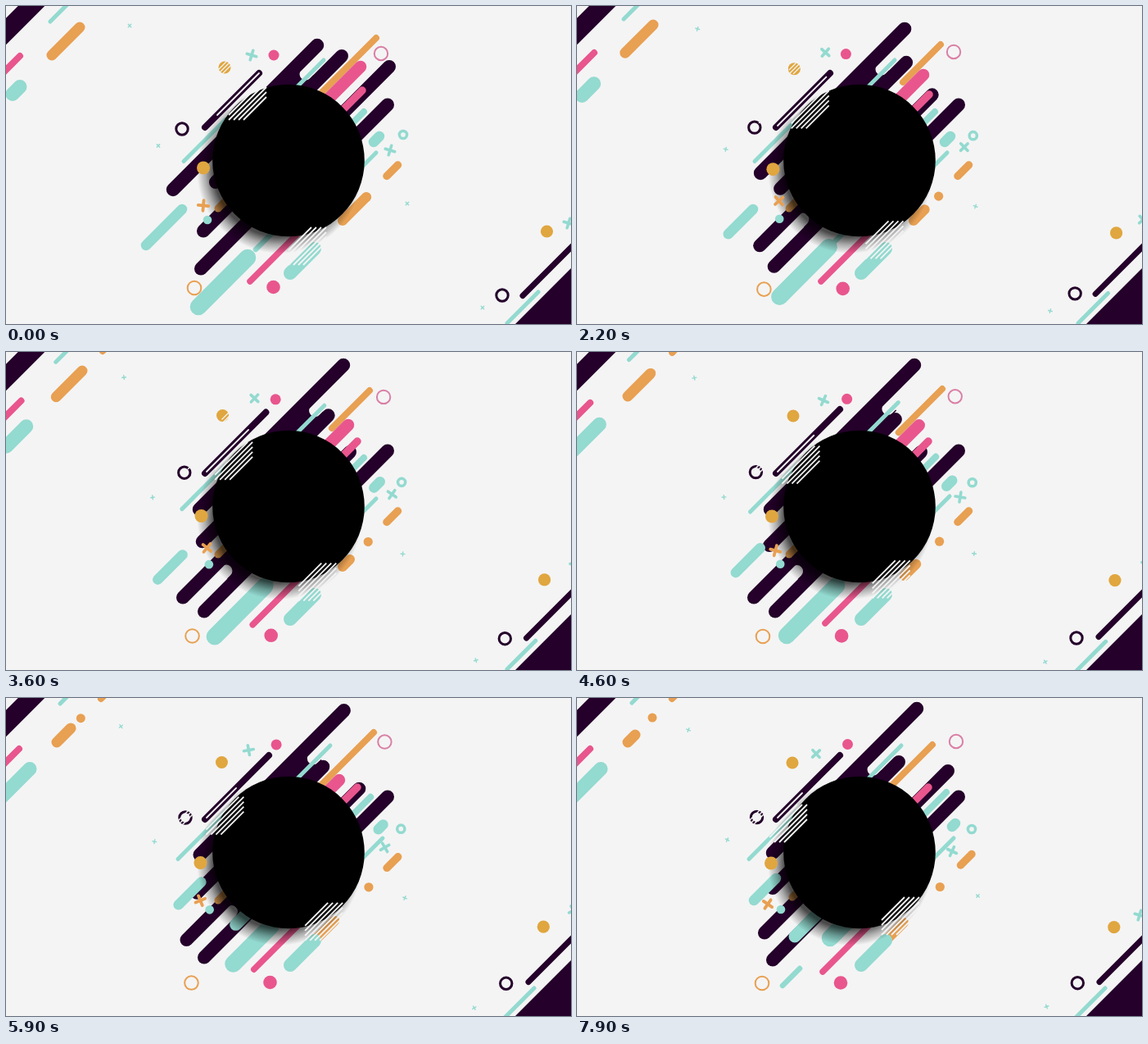
Animation of 690x388 px, one loop 8 s. Source, as an HTML page with a canvas:

```html
<!DOCTYPE html>
<html lang="en">
<head>
<meta charset="utf-8">
<title>Sliding bars</title>
<style>
  html, body { margin: 0; width: 100%; height: 100%; overflow: hidden; background: #f4f4f4; }
  canvas { display: block; width: 690px; height: 388px; }
</style>
</head>
<body>
<canvas id="stage" width="690" height="388"></canvas>
<script>
const ctx = document.getElementById('stage').getContext('2d');
const LOOP = 8, STEP = .1, END = LOOP - STEP;
const PAPER = '#f4f4f4', DARK = '#24002a', ORANGE = '#e8a052',
      PINK = '#e8568d', TEAL = '#93dad0', GOLD = '#e0a63f';
let now = 0; // seconds into the loop

// Eased travel of the given amount between two moments.
function go(amount, from, to) {
  const u = Math.min(1, Math.max(0, (now - from) / (to - from)));
  return amount * u * u * (3 - 2 * u);
}

// Travel to a turning point, then a second travel until the loop ends.
const swing = (out, peak, back) => go(out, 0, peak) + go(back, peak, END);

// Slow-down travel shared by all round dots.
const drift = amount => amount * (1 - (1 - now / END) ** 1.6);

function line(color, width, x1, y1, x2, y2, cap = 'round') {
  ctx.strokeStyle = color;
  ctx.lineWidth = width;
  ctx.lineCap = cap;
  ctx.beginPath();
  ctx.moveTo(x1, y1);
  ctx.lineTo(x2, y2);
  ctx.stroke();
}

// Diagonal bar on the line x + y = sum, from x = left to x = right.
function bar(color, width, sum, left, right, cap) {
  line(color, width, left, sum - left, right, sum - right, cap);
}

function circle(x, y, r, color, stroke = 0) {
  ctx.beginPath();
  ctx.arc(x, y, r, 0, Math.PI * 2);
  if (stroke) {
    ctx.strokeStyle = color;
    ctx.lineWidth = stroke;
    ctx.stroke();
  } else {
    ctx.fillStyle = color;
    ctx.fill();
  }
}

function dot(x, y, r, color, distance, stroke) {
  const d = drift(distance);
  circle(x + d, y - d, r, color, stroke);
}

// Diagonal white lines inside a square with two corners cut off.
function hatch(x, y, half, gap, width) {
  const lines = Math.floor(half / gap);
  for (let i = -lines; i <= lines; i++) {
    const off = i * gap / 2, reach = half - Math.abs(off);
    line(PAPER, width, x + off - reach, y + off + reach, x + off + reach, y + off - reach, 'butt');
  }
}

// Cross that turns while it moves along the diagonal by d.
function cross(x, y, size, color, d, turn = 17) {
  ctx.save();
  ctx.translate(x + d, y - d);
  ctx.rotate((turn + 7.5 * d) * Math.PI / 180);
  line(color, size * .6, -size, 0, size, 0);
  line(color, size * .6, 0, -size, 0, size);
  ctx.restore();
}

function drawCorners() {
  bar(DARK, 23, 31, -20, 60);
  bar(TEAL, 5, 73, 54 + go(13, 0, 7), 90);
  bar(ORANGE, 8, 117, 123 + go(-7, 1, 5), 140);
  bar(ORANGE, 13, 116, 56 + go(6, 0, 4.6), 90 + go(3, 0, 2) + go(-22, 3.6, 7.5));
  bar(PINK, 8, 78, -8, 17 + go(4, 0, 1.8) + go(-5, 2.4, 4.8));
  bar(TEAL, 17, 115.5, 8 + go(-24, 1, END), 17 + go(12, 0, 6));
  dot(86, 30, 5.5, ORANGE, 6);

  ctx.fillStyle = DARK;
  ctx.beginPath();
  ctx.moveTo(690, 320);
  ctx.lineTo(690, 388);
  ctx.lineTo(622, 388);
  ctx.fill();
  bar(DARK, 7, 984.5, 631 + go(7, 0, 6), 710);
  bar(TEAL, 5, 999, 612 + go(-6, 3.5, 6), 650 + go(-5, 0, 6));
}

function drawUpperBars() {
  // dark gap with a pale round end cut into it
  const notch = 366 + swing(14, 4.9, -18);
  bar(DARK, 18, 449, 320, notch + 4, 'butt');
  bar(PAPER, 15, 449, notch, notch + 30);

  const a = go(32, .5, 3.4) + go(3, 5, END);
  bar(DARK, 16.5, 428, 204 + a, 380 + a);
  const b = swing(-23, 5.6, 6);
  bar(DARK, 16, 471, 256 + b, 410 + b);
  bar(TEAL, 5, 454, 350, 388 + go(8, 3, 6));
  bar(TEAL, 5, 406.5, 217 + go(-7, 2.5, 5.5), 268);

  bar(ORANGE, 8, 491, 385 + go(13, 0, 2) + go(-13, 3.6, 5.9),
      452 + go(-8, 0, 2) + go(5, 3.6, 5.9) + go(-15, 5.9, END));
  bar(PINK, 14.5, 507, 386, 433 + go(-15, 0, 3.6) + go(-28, 4.4, END));
  bar(DARK, 16, 542, 380, 468 + go(-48, 0, 3.4) + go(33, 4.6, END));
  bar(PINK, 9.5, 538, 405, 435 + go(-6, 0, 3));
  bar(TEAL, 8, 566, 418, 437 + go(14, 4, 7.4));
  bar(DARK, 16, 586.5, 415, 466);
  bar(TEAL, 5, 631, 430, 452 + go(8, 3.6, 6));
  bar(TEAL, 12.5, 615, 449 + go(9, 3, END), 456 + go(6, 2.5, 7.5));
  const k = go(3.5, 5.6, END);
  bar(ORANGE, 9.5, 672.5, 465 + k, 478.5 + k);
  bar(ORANGE, 12, 673, 411 + go(-30, 3.6, 6), 440 + go(-20, 0, 3.2) + go(-21, 3.6, 6.5));
}

function drawLowerBars() {
  const notch = 285 + swing(-17, 4.2, 17);
  bar(DARK, 18, 536, notch - 4, 310, 'butt');
  bar(PAPER, 15, 536, notch - 30, notch);

  bar(DARK, 16, 515.5, 241 + go(-25, 0, 3.4) + go(13, 4.6, END), 305);
  bar(DARK, 16, 558.5, 238 + go(4, 0, 3.6) + go(-3, 5.9, END), 305);
  bar(TEAL, 15, 557, 310 + go(-44, 3.2, 7.6), 320);
  bar(TEAL, 12.5, 463, 171 + go(14, 0, 2.4) + go(31, 3.4, 6.8), 215 + go(28, 3.3, 6.8));
  bar(ORANGE, 9, 506, 259 + go(4, 5.9, END), 274);
  const s = go(-54, 5.2, END);
  bar(TEAL, 6.5, 602, 305 + s, 326 + s);
  bar(TEAL, 20.5, 602, 235 + go(20, 0, 3.8) + go(54, 4.3, END),
      295 + go(22, 0, 4) + go(18, 4.6, END));
  bar(PINK, 7.5, 634, 298 + go(5, 2.4, 4.4) + go(-3, 5.5, END), 365);
  bar(TEAL, 16, 673, 347, 377);
}

function drawDisc() {
  const shade = ctx.createRadialGradient(334, 201, 80, 334, 201, 101);
  shade.addColorStop(0, 'rgba(0,0,0,.7)');
  shade.addColorStop(.5, 'rgba(0,0,0,.3)');
  shade.addColorStop(1, 'rgba(0,0,0,0)');
  circle(334, 201, 101, shade);
  circle(345, 188.5, 92.8, '#000');

  const u = now / END;
  hatch(295 - 37 * u, 116 + 37 * u, 23, 6, 1.8);
  hatch(368 + 27 * u, 293 - 27 * u, 23, 6, 1.8);

  // split bar beside the disc
  bar(DARK, 8, 391, 243, 309 + go(12, 2.2, 4.4));
  bar(PAPER, 1.8, 391, 258 + go(-13, 0, 2.2), 309 + go(-34, .5, END));
}

function drawDots() {
  dot(267, 75, 7.5, GOLD, -4);
  const s = go(14, 3, 4.6);
  hatch(267 + s, 75 + s, 8, 5, 1.3);

  dot(215, 150, 7.2, DARK, 4.5, 3);
  const r = 16 + go(-12, 3.8, 5.8);
  hatch(215 + r, 150 - r, 9, 5, 1.5);

  dot(327, 60, 6.5, PINK, 3.5);
  dot(458, 58, 8.2, '#d97fa5', 5, 2);
  dot(326.5, 343, 8.3, PINK, -4.5);
  dot(230, 344, 8.3, ORANGE, -4, 2);
  dot(241, 197.5, 8, GOLD, -4);
  dot(246, 261, 5.3, TEAL, 3);
  dot(485, 157, 4.6, TEAL, -3, 3.5);
  dot(660.5, 275, 7.6, GOLD, -4.7);
  dot(606, 353, 7.2, DARK, 5.3, 3);
  dot(440.5, 233.3, 5.6, ORANGE, 2.8);

  cross(300, 60, 6, TEAL, swing(4, 3, -12));
  cross(469, 176, 6, TEAL, swing(4, 2.5, -15));
  cross(241, 243.5, 6.3, ORANGE, swing(6, 2.5, -14), 5);
  cross(687, 265, 6, TEAL, swing(9, 4.6, -9));
  cross(151, 24, 2.4, TEAL, swing(-7.5, 4.3, -7.5), 45);
  cross(186, 170.5, 2.4, TEAL, swing(-7, 3.8, 4.5), 45);
  cross(490, 241, 2.4, TEAL, swing(-5.5, 3.8, 5), 45);
  cross(582, 368, 2.4, TEAL, swing(-10.5, 5.2, 2), 45);
}

function draw(ms) {
  now = Math.floor(ms % (LOOP * 1000) / (STEP * 1000)) * STEP;
  ctx.fillStyle = PAPER;
  ctx.fillRect(0, 0, 690, 388);
  drawCorners();
  drawUpperBars();
  drawLowerBars();
  drawDisc();
  drawDots();
}

const start = performance.now();
function tick() {
  draw(performance.now() - start);
  requestAnimationFrame(tick);
}
tick();
</script>
</body>
</html>
```
